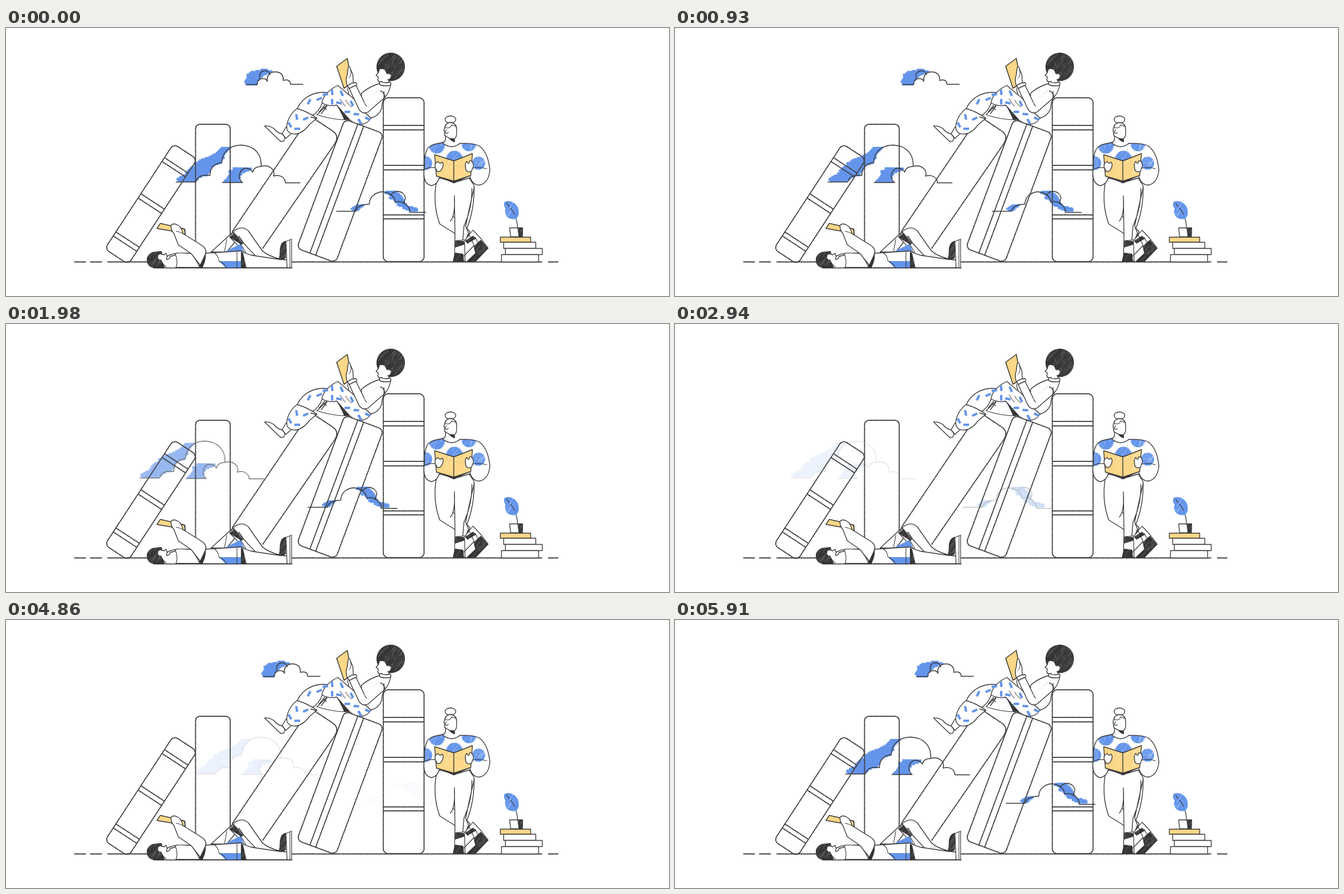
An HTML page with a canvas that plays this animation: 1177 by 476 pixels, repeating every 5940 ms.

```html
<!DOCTYPE html>
<html lang="en">
<head>
<meta charset="utf-8">
<title>Readers among giant books</title>
<style>
  html, body { margin: 0; width: 100%; height: 100%; overflow: hidden; background: #fff; }
  canvas { display: block; }
</style>
</head>
<body>
<canvas id="stage" width="1177" height="476"></canvas>
<script>
const W = 1177, H = 476, LOOP = 5940;
const INK = '#353537', BLUE = '#6495eb', YELLOW = '#fcd787', WHITE = '#fff';

let seed = 7;
function rnd() {
  seed = (seed * 16807) % 2147483647;
  return seed / 2147483647;
}
const jitter = a => (rnd() * 2 - 1) * a;

function layer(draw) {
  const c = document.createElement('canvas');
  c.width = W;
  c.height = H;
  const g = c.getContext('2d');
  g.lineCap = g.lineJoin = 'round';
  draw(g);
  return c;
}

const asPath = p => typeof p === 'string' ? new Path2D(p) : p;

function line(g, p, w = 1.35, color = INK) {
  g.strokeStyle = color;
  g.lineWidth = w;
  g.stroke(asPath(p));
}

function shape(g, p, fill = WHITE, w = 1.35) {
  p = asPath(p);
  g.fillStyle = fill;
  g.fill(p);
  if (w) line(g, p, w);
}

// Grainy pencil line: a thin stroke with an uneven, broken one on top
function pencil(g, p) {
  p = asPath(p);
  line(g, p, 1.3, '#4a4a4c');
  g.setLineDash([1.4, 2.1, 2.3, 1.7, 0.8, 2.4]);
  line(g, p, 1.9, '#444446');
  g.setLineDash([]);
}

// Solid area with light diagonal pencil scratches
function scratched(g, p, fill, x, y, w, h, n, alpha = 0.25) {
  p = asPath(p);
  shape(g, p, fill, 0);
  g.save();
  g.clip(p);
  g.strokeStyle = `rgba(255,255,255,${alpha})`;
  g.lineWidth = 0.8;
  for (let i = 0; i < n; i++) {
    const px = x + rnd() * w, py = y + rnd() * h, len = 5 + rnd() * 9;
    g.beginPath();
    g.moveTo(px, py);
    g.lineTo(px + len * 0.62, py - len);
    g.stroke();
  }
  g.restore();
}

function ellipse(x, y, rx, ry = rx, a = 0) {
  const p = new Path2D();
  p.ellipse(x, y, rx, ry, a, 0, Math.PI * 2);
  return p;
}

function book(g, cx, cy, w, h, deg, bands, stripes = []) {
  g.save();
  g.translate(cx, cy);
  g.rotate(deg * Math.PI / 180);
  const p = new Path2D();
  p.roundRect(-w / 2, -h / 2, w, h, 9);
  for (const b of bands) {
    p.moveTo(-w / 2, b - h / 2);
    p.lineTo(w / 2, b - h / 2);
  }
  for (const s of stripes) {
    p.moveTo(s, -h / 2);
    p.lineTo(s, h / 2);
  }
  pencil(g, p);
  g.restore();
}

function drawBooks(g) {
  book(g, 257.3, 312.7, 50, 223, 33.2, [29.4, 37.4, 106, 115, 187, 195.5]);
  pencil(g, 'M336.5 383V180Q336.5 171 345.5 171H389Q398 171 398 180V368');
  pencil(g, 'M402 361L531 170Q539 156 550 163L580 183Q592 191 584 205L456 391');
  book(g, 593.3, 289.4, 73.5, 244.5, 20.4, [], [-12, -1]);
  book(g, 706, 269.5, 72.5, 291, 0, [49, 57, 120, 128, 208, 215]);
}

function drawGround(g) {
  pencil(g, 'M122 415.5H141M150 415.5H170M181 415.5H252M508 415.5H951M963 415.5H980');
}

function drawSitter(g) {
  // far leg, foot and near shin
  shape(g, 'M517 143C526 124 546 111 573 115L562 132Q556 149 541 158Z');
  shape(g, 'M497 176L490 188L497 196L510 184Z');
  shape(g, 'M459 174L487 201Q495 204 495 194L490 188Q481 186 476 179Q468 173 459 174Z');
  shape(g, 'M517 143C505 151 496 169 499 181Q504 190 516 188Q528 186 538 172L552 160Q534 148 517 143Z');
  line(g, 'M541 158L551 161M556 149L566 137M560 152L570 138M564 141L569 145');
  line(g, 'M569 138L552 154Q578 163 604 163', 1.2);
  // seat shadow and near thigh
  scratched(g, 'M587 137L598 140L612 164L600 163Q596 152 587 137Z', INK, 585, 137, 27, 28, 9);
  shape(g, 'M589 102C574 109 562 121 561 133Q573 140 587 137L611 164Q620 171 632 171Q643 169 648 160L632 145Q620 126 607 117Z');
  line(g, 'M593 126L602 139M603 128Q608 137 614 140', 1);
  const dashes = [[538, 131, -65], [556, 126, -22], [516, 158, 80], [532, 161, -25], [504, 172, 60],
    [517, 179, 0], [579, 131, 90], [567, 118, -10], [596, 116, 65], [591, 133, 10], [579, 114, 85],
    [614, 134, 65], [622, 153, 5], [606, 149, 0], [628, 166, 60], [642, 161, 28]];
  for (const [x, y, deg] of dashes) {
    const a = deg * Math.PI / 180, dx = Math.cos(a) * 5, dy = Math.sin(a) * 5;
    g.lineCap = 'butt';
    line(g, `M${x - dx} ${y - dy}L${x + dx} ${y + dy}`, 4.2, BLUE);
    g.lineCap = 'round';
  }
  // torso
  shape(g, 'M665 98Q644 104 631 116L632 145L648 160Q661 157 667 143Q667 132 672 124Q681 114 683 100Z');
  // held book and arm
  shape(g, 'M587 68L606 54L614 98L600 107Z', YELLOW, 1.5);
  shape(g, 'M606 103Q602 91 606 83Q606 76 608 69Q611 67 612 75Q617 82 616 90L617 101Z');
  line(g, 'M612 75Q614 84 609 89', 1);
  shape(g, 'M608 105L627 145Q634 154 643 149L673 123Q671 112 662 111L637 134L621 101Z');
  line(g, 'M606 107L609 119', 1.2);
  g.save();
  line(g, 'M663 111L637 134', 2.5, WHITE);
  line(g, 'M637 134L640 139M671 113V124');
  g.restore();
  shape(g, 'M607 102Q613 97 621 97Q625 100 621 102Q615 104 611 107Q606 106 607 102Z');
  // head
  scratched(g, ellipse(683, 69, 25.3), INK, 655, 48, 52, 52, 85, 0.2);
  shape(g, 'M662 74Q668 71 673 75Q675 80 676 82Q682 80 683 85Q682 91 678 91L681 99Q673 102 666 99L668 95Q661 97 660 92L661 87L657 84L661 79Z', WHITE, 0);
  line(g, 'M663 73L661 79L657 84L661 87L660 92Q661 97 668 95L666 99M678 91L681 97');
  shape(g, 'M665 95Q673 99 682 96Q685 99 682 102Q672 104 664 101Q662 97 665 95Z');
}

function drawLying(g) {
  // raised leg
  shape(g, 'M364 398L402 363Q417 349 430 360L453 393Q460 403 485 410L440 410L414 370L392 398Z');
  shape(g, 'M397 371L404 363L442 404L428 404Z', WHITE, 1.2);
  scratched(g, 'M397 372L405 365L421 383L418 385Z', INK, 396, 364, 25, 22, 7);
  shape(g, 'M389 397L417 383L422 397Z', BLUE, 0);
  line(g, 'M404 364L426 399M392 375L388 397', 1.1);
  // body, straight leg
  shape(g, 'M270 426V416Q288 401 304 400H354L417 396Q425 401 438 404L486 411L499 412V426Z');
  shape(g, 'M378 414H418L422 426H390Z', BLUE, 0);
  line(g, 'M378 414Q388 418 391 426M366 397Q377 402 378 414M410 397V426', 1.1);
  scratched(g, 'M417 397L421 400L427 426H417Z', INK, 416, 397, 11, 29, 10);
  scratched(g, 'M354 396Q357 408 349 426H341Q346 412 354 396Z', INK, 340, 397, 16, 29, 8);
  // shoe
  shape(g, 'M497 379L507 375V426H499Z', WHITE, 1.2);
  line(g, 'M504 377V426', 1);
  scratched(g, 'M497 378Q486 380 486 397Q486 404 484 411Q492 414 497 408Z', INK, 484, 380, 14, 34, 15);
  // top and arms
  shape(g, 'M300 401Q306 398 331 401L344 425H302Q306 412 300 401Z', WHITE, 1.2);
  shape(g, 'M268 356L274 347L317 357L318 367L302 362Z', YELLOW, 1.4);
  shape(g, 'M293 350Q298 346 305 350Q312 354 314 365L349 387Q358 394 353 404L345 421Q336 411 329 401L306 385L298 365Q292 358 293 350Z');
  line(g, 'M314 365L318 367V358L309 355', 1.2);
  line(g, 'M302 361Q309 362 314 365', 1);
  // head
  scratched(g, 'M270 397Q278 394 277 401L274 410Q279 417 282 426H262Q249 424 250 409Q254 396 270 397Z', INK, 250, 398, 32, 30, 40, 0.2);
  shape(g, 'M271 402L275 401L280 403L284 400L286 405L285 411Q290 412 291 407Q296 405 300 408V426H282Q279 417 275 412Q269 412 270 407Z', WHITE, 0);
  line(g, 'M271 402L275 401L280 403L284 400L286 405L285 411Q291 411 291 406L301 403M275 412Q270 413 269 408M275 412Q278 420 284 424');
  line(g, 'M262 426.3H508', 1.4);
}

function drawStander(g) {
  // trousers
  shape(g, 'M764 274Q757 312 770 348L797 365V379L816 377L824 362L818 356Q832 322 831 280L822 266H770Z');
  line(g, 'M796 298L797 365M796 299Q798 332 789 343M797 337L794 335M827 285Q828 318 813 352L811 376M831 284Q822 322 816 352L821 364L816 377');
  // boots
  shape(g, 'M797 378L817 376L815 414H796Z', WHITE, 1.2);
  scratched(g, 'M796 378L812 378L816 384L797 390ZM797 399L812 401L813 415H793Z', INK, 794, 376, 24, 38, 16);
  shape(g, 'M814 378L829 359L844 375L856 391L833 415H815Z', WHITE, 1.2);
  scratched(g, 'M830 388L843 376L856 391L833 415H817L833 400Z', INK, 815, 376, 40, 40, 28);
  scratched(g, 'M829 369L835 374L819 383L815 378Z', INK, 815, 370, 20, 14, 8);
  line(g, 'M822 367L831 386L813 405M833 372L838 381', 1.2);
  // sweater
  const sweater = new Path2D('M776 203C762 207 750 205 745 222Q742 232 743 246Q738 276 755 280Q766 278 769 266L797 274L824 266Q829 279 840 279Q857 276 859 252Q856 222 841 210Q831 204 805 205Q790 211 776 203Z');
  shape(g, sweater, WHITE, 0);
  g.save();
  g.clip(sweater);
  for (const [x, y, r] of [[765, 209, 14], [822, 206, 13], [796, 233, 15], [744, 240, 12.5], [839, 240, 11.5]])
    scratched(g, ellipse(x, y, r), BLUE, x - r - 4, y - r + 5, 2 * r, 2 * r, 16, 0.42);
  g.restore();
  line(g, sweater);
  line(g, 'M766 249Q752 246 743 251M829 249Q840 246 853 250M824 249V266', 1.1);
  // book and hands
  scratched(g, 'M764 259L795 264L827 259L821 264L795 276L768 264Z', INK, 764, 260, 62, 17, 22);
  scratched(g, 'M761 225L795 236L828 223L825 262L795 272L764 263Z', YELLOW, 762, 230, 62, 42, 25, 0.45);
  line(g, 'M761 225L795 236L828 223L825 262L795 272L764 263ZM795 236V272', 1.4);
  shape(g, 'M766 255Q759 246 763 240L767 237Q771 243 774 238Q778 242 774 250Q771 256 766 255Z');
  shape(g, 'M826 255Q816 257 816 249Q814 241 818 237Q822 244 823 236Q829 235 830 245Z');
  // head
  shape(g, ellipse(789, 162.5, 9.5, 6.3));
  shape(g, 'M780 194Q781 201 775 204Q790 216 806 205Q798 202 797 195Z', WHITE, 0);
  line(g, 'M780 191Q782 202 775 204Q790 217 806 205');
  shape(g, 'M779 191Q778 187 779 184Q776 182 779 177Q780 168 790 168Q800 169 800 181Q801 194 796 197Q787 197 779 191Z');
  line(g, 'M779 177Q790 179 791 172Q796 174 800 175M783 181Q780 181 780 186Q783 189 785 185', 1.1);
  scratched(g, 'M785 194Q791 199 797 196L797 203Q790 202 785 194Z', INK, 786, 194, 11, 8, 5);
}

function drawPlant(g) {
  line(g, 'M908 355Q908 342 902 330', 1.3);
  scratched(g, 'M885 309Q892 305 901 310Q911 317 910 327Q912 334 905 339Q896 341 889 335Q884 326 887 321Q882 314 885 309Z', BLUE, 883, 310, 26, 30, 18, 0.25);
  line(g, 'M889 311L893 317M896 320L903 331', 1.3);
  shape(g, 'M894 355H917V371H896Z');
  scratched(g, 'M908 355H918L916 371H910Z', INK, 907, 355, 10, 16, 7);
  const pile = [[877, 371, 54, 9, YELLOW], [883, 380, 57, 11], [886, 391, 65.5, 11], [879, 402, 66, 13]];
  for (const [x, y, w, h, fill = WHITE] of pile) {
    const p = new Path2D();
    p.rect(x + 0.5, y + 0.5, w, h);
    shape(g, p, fill);
  }
}

// Horizontal brush strokes between left and right edges given at a few heights
function brush(g, rows) {
  g.strokeStyle = BLUE;
  g.lineCap = 'butt';
  g.lineWidth = 3.4;
  for (let i = 0; i + 1 < rows.length; i++) {
    const [y0, l0, r0] = rows[i], [y1, l1, r1] = rows[i + 1];
    for (let y = y0; y <= y1; y += 2.2) {
      const k = (y - y0) / (y1 - y0);
      g.beginPath();
      g.moveTo(l0 + (l1 - l0) * k + jitter(3), y);
      g.lineTo(r0 + (r1 - r0) * k + jitter(2), y + jitter(0.5));
      g.stroke();
    }
  }
  g.lineCap = 'round';
}

const linear = (t, a, b) => Math.min(1, Math.max(0, (t - a) / (b - a)));

// speed in px/s; out and back are fade spans in ms
const clouds = [
  {
    speed: 32.5, backSpeed: 32.5, gap: 0, out: [1400, 3150], back: [4720, 5800],
    art: layer(g => {
      brush(g, [[213, 384, 398], [222, 371, 390], [235, 344, 385], [240, 337, 382], [247, 329, 366], [262, 314, 358], [265, 307, 345], [272, 304, 337]]);
      brush(g, [[249, 402, 438], [254, 398, 430], [259, 398, 418], [266, 391, 415], [273, 388, 416]]);
      line(g, 'M302 273.5H337Q341 259 362 262Q362 242 383 239C384 219 398 208 418 208C441 209 454 224 453 245', 1.5);
      line(g, 'M384 274.5H420C411 268 413 253 424 249Q433 248 438 256Q440 246 453 246C465 242 479 250 475 263C488 259 496 267 496 275H522', 1.5);
    })
  },
  {
    speed: 25.6, backSpeed: 25.6, gap: 0, out: [2200, 3250], back: [4830, 5800],
    art: layer(g => {
      brush(g, [[291, 672, 692], [297, 678, 700], [303, 682, 706], [310, 692, 707], [316, 697, 713], [320, 704, 731], [326, 716, 732]]);
      brush(g, [[315, 624, 637], [319, 616, 630], [324, 612, 624]]);
      line(g, 'M587 325.5H621Q624 313 645 313C645 299 657 291 669 291C681 292 690 299 691 309C704 306 717 315 717 327.5H745', 1.5);
      line(g, 'M683 297Q688 290 696 290Q708 292 709 302L706 312', 1.5);
    })
  },
  {
    speed: 24, backSpeed: 26.3, gap: 2, out: [950, 1700], back: [3600, 4820],
    art: layer(g => {
      brush(g, [[74, 449, 467], [78, 437, 475], [83, 429, 460], [90, 428, 450], [96, 425, 447], [101, 423, 447]]);
      line(g, 'M426 100.5H446Q446 89 457 90Q462 90 464 95C462 84 469 78 478 78C488 78 493 84 492 93Q505 90 505 100H527', 1.5);
      line(g, 'M451 90C448 82 453 76 460 76Q467 76 469 83', 1.5);
    })
  }
];

const scene = layer(g => {
  drawGround(g);
  drawBooks(g);
  drawSitter(g);
  drawLying(g);
  drawStander(g);
  drawPlant(g);
});

const ctx = document.getElementById('stage').getContext('2d');

function frame(now) {
  const t = now % LOOP;
  ctx.globalAlpha = 1;
  ctx.fillStyle = WHITE;
  ctx.fillRect(0, 0, W, H);
  for (const c of clouds) {
    const leaving = t < c.out[1];
    const dx = leaving ? -c.speed * t / 1000 : c.gap + c.backSpeed * (LOOP - t) / 1000;
    ctx.globalAlpha = leaving ? 1 - linear(t, ...c.out) : linear(t, ...c.back);
    if (ctx.globalAlpha > 0) ctx.drawImage(c.art, dx, 0);
  }
  ctx.globalAlpha = 1;
  ctx.drawImage(scene, 0, 0);
}

const start = performance.now();
function tick() {
  frame(performance.now() - start);
  requestAnimationFrame(tick);
}
tick();
</script>
</body>
</html>
```
